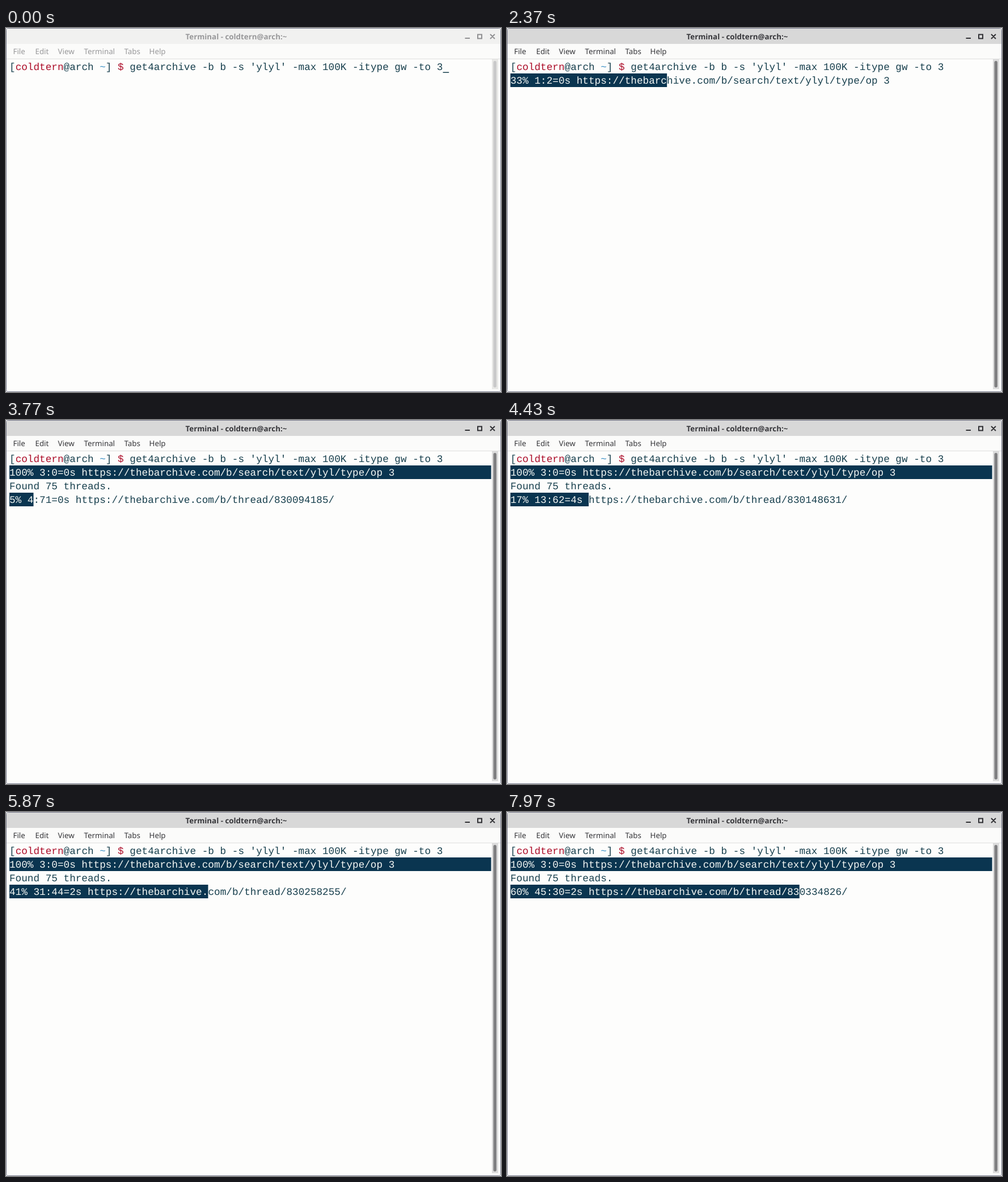
Write an HTML page that moves like this. It is 873 px wide and 641 px high and loops after 8000 ms.

```html
<!DOCTYPE html>
<html lang="en">
<head>
<meta charset="utf-8">
<title>Terminal</title>
<style>
  html, body { margin: 0; width: 100%; height: 100%; overflow: hidden; background: #fff; }
  svg { display: block; }
  text { white-space: pre; text-rendering: geometricPrecision; }
  .ui { font: 13.33px "Noto Sans", sans-serif; fill: #36363a; }
  .title { font-weight: 700; }
  .term { font: 17.7px "Liberation Mono", monospace; fill: #173f4d; }
  .red { fill: #ac0c28; }
  .blue { fill: #3a8fc4; }
  .done { fill: #f4f7f4; }
  .icon { fill: none; stroke: #303034; stroke-width: 2; }
  .blurred .ui { fill: #98989a; }
  .blurred .icon { stroke: #909092; }
  .blurred #titlebar { fill: #f1f1f0; }
  .blurred #trough { fill: #e8e8e6; }
  .blurred #thumb { fill: #c9c9ca; }
</style>
</head>
<body>
<svg id="window" width="873" height="641" viewBox="0 0 873 641">
  <rect x=".5" y=".5" width="872" height="640" rx="3" fill="#fdfdfc" stroke="#777a8c"/>
  <path id="titlebar" d="M1 28V4q0-3 3-3H869q3 0 3 3V28z" fill="#d8d8d8"/>
  <rect x="1" y="28" width="871" height="26" fill="#fbfbfa"/>
  <rect x="1" y="54" width="871" height="1" fill="#dedede"/>
  <text class="ui title" x="316.5" y="19.5">Terminal - coldtern@arch:~</text>
  <path class="icon" d="M809.5 18H818M832 11.5h7v7h-7zM854 11l8 8m0-8l-8 8"/>
  <g class="ui">
    <text x="12.5" y="46">File</text>
    <text x="51.5" y="46">Edit</text>
    <text x="91.5" y="46">View</text>
    <text x="137.5" y="46">Terminal</text>
    <text x="208.5" y="46">Tabs</text>
    <text x="252.5" y="46">Help</text>
  </g>
  <rect id="trough" x="857" y="55" width="11" height="581" fill="#dcdcdc"/>
  <rect id="thumb" x="859.5" y="58" width="5.5" height="575" rx="2.7" fill="#808082"/>
  <g class="term">
    <text x="6" y="74">[<tspan class="red">coldtern</tspan>@arch <tspan class="blue">~</tspan>] <tspan class="red">$</tspan> get4archive -b b -s 'ylyl' -max 100K -itype gw -to 3</text>
    <rect id="cursor" x="770.6" y="77.5" width="10.6" height="1.5"/>
    <text id="found" x="6" y="122">Found 75 threads.</text>
  </g>
</svg>
<script>
const LOOP = 8000, COLUMNS = 80, CELL = 17.7 * 0.6, LEFT = 6, TOP = 56, ROW = 24;
const FOCUS_AT = 300, ENTER_AT = 900, FIRST_TICK = 1100;
const SEARCH = [[1000, 0], [1950, 1], [2600, 2], [3150, 3]];
const THREADS = [[3230, 0], [3720, 4], [4400, 13], [5840, 31], [7940, 45]];
const THREAD_IDS = [[0, 830070000], [4, 830094185], [13, 830148631], [31, 830258255], [45, 830334826]];

const $ = id => document.getElementById(id);
const svg = $("window");

function add(tag, parent, attributes) {
  const node = document.createElementNS("http://www.w3.org/2000/svg", tag);
  for (const name in attributes) node.setAttribute(name, attributes[name]);
  return parent.appendChild(node);
}

function interpolate(points, x) {
  let i = 1;
  while (i < points.length - 1 && x >= points[i][0]) i++;
  const [x0, y0] = points[i - 1], [x1, y1] = points[i];
  const k = Math.min(1, Math.max(0, (x - x0) / (x1 - x0)));
  return y0 + (y1 - y0) * k;
}

// A status line whose finished share is shown in inverse colours.
function progressLine(row) {
  const group = add("g", svg, { class: "term" });
  const bar = add("rect", group, { x: LEFT, y: TOP + row * ROW, height: ROW, fill: "#0a3550" });
  const y = TOP + row * ROW + 18;
  const done = add("text", group, { x: LEFT, y, class: "done" });
  const rest = add("text", group, { y });
  return (visible, count, total, elapsed, url) => {
    group.style.display = visible ? "" : "none";
    const left = total - count;
    const eta = count ? Math.floor(elapsed * left / count) : 0;
    const line = `${Math.floor(100 * count / total)}% ${count}:${left}=${eta}s ${url}`;
    const split = Math.floor(COLUMNS * count / total);
    bar.setAttribute("width", split * CELL);
    done.textContent = line.slice(0, split);
    rest.textContent = line.slice(split);
    rest.setAttribute("x", LEFT + split * CELL);
  };
}

const showSearch = progressLine(1);
const showThreads = progressLine(3);

function render(t) {
  svg.classList.toggle("blurred", t < FOCUS_AT);
  $("cursor").style.display = t < ENTER_AT ? "" : "none";

  const pages = SEARCH.filter(([at]) => t >= at).length - 1;
  showSearch(pages >= 0, Math.max(0, pages), 3, 0,
    "https://thebarchive.com/b/search/text/ylyl/type/op 3");

  const listed = t >= THREADS[0][0];
  $("found").style.display = listed ? "" : "none";
  const count = Math.floor(interpolate(THREADS, t));
  const elapsed = Math.max(0, Math.floor((t - FIRST_TICK) / 1000) - 2);
  const id = Math.round(interpolate(THREAD_IDS, count));
  showThreads(listed, count, 75, elapsed, `https://thebarchive.com/b/thread/${id}/`);
}

const start = performance.now();
function tick() {
  render((performance.now() - start) % LOOP);
  requestAnimationFrame(tick);
}
tick();
</script>
</body>
</html>
```
